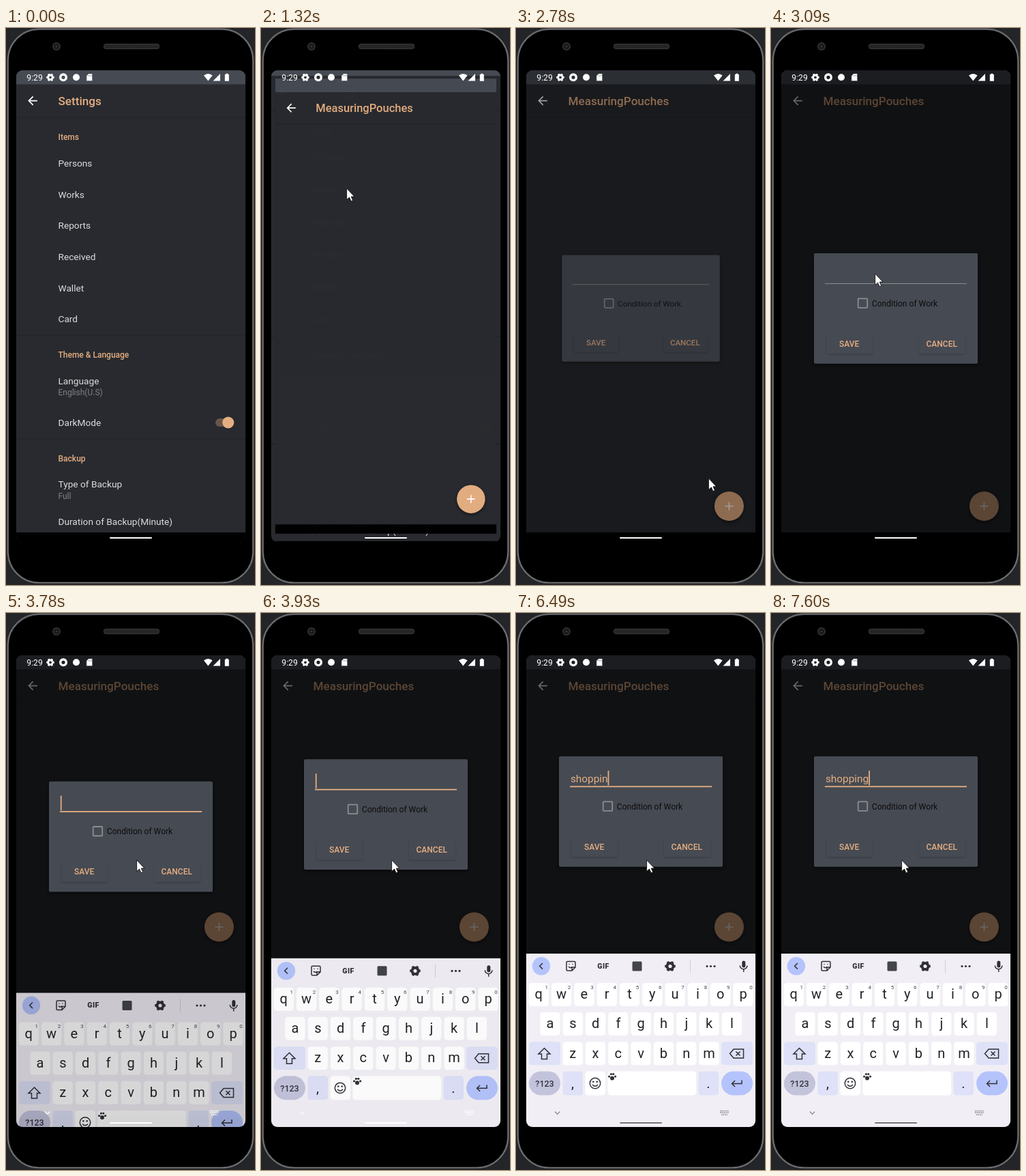
These frames come from a looping animation (365x816 px, 8 s). An HTML page:

```html
<!DOCTYPE html>
<html lang="en">
<head>
<meta charset="utf-8">
<title>Settings</title>
<style>
html, body { margin: 0; width: 100%; height: 100%; overflow: hidden; background: #000; }
svg { display: block; width: 365px; height: 816px; font-family: Roboto, sans-serif; }
.bar { font-size: 17.1px; font-weight: 500; fill: #e5ae82; }
.head { font-size: 12px; font-weight: 500; fill: #e5ae82; }
.row { font-size: 13.68px; fill: #dcdcde; }
.sub { font-size: 12px; fill: #7f8186; }
.key { font-size: 20px; fill: #222327; text-anchor: middle; }
.hint { font-size: 8px; fill: #44454b; text-anchor: middle; }
.line { fill: none; stroke: #303136; stroke-width: 1.5; }
.shade { filter: drop-shadow(0 2px 2px #0008); }
.soft { filter: drop-shadow(0 1px 1px #0003); }
</style>
</head>
<body>
<svg id="stage" viewBox="0 0 365 816"></svg>
<script>
const orange = '#e5ae82', panel = '#464a52', ink = '#303136';
const rect = (x, y, w, h, fill, r = 0, more = '') =>
  `<rect x="${x}" y="${y}" width="${w}" height="${h}" rx="${r}" fill="${fill}" ${more}/>`;
const circle = (x, y, r, fill, more = '') => `<circle cx="${x}" cy="${y}" r="${r}" fill="${fill}" ${more}/>`;
const text = (x, y, s, cls, more = '') => `<text x="${x}" y="${y}" class="${cls}" ${more}>${s}</text>`;
const path = (d, more = 'class="line"') => `<path d="${d}" ${more}/>`;
const group = (id, body, more = '') => `<g id="${id}" ${more}>${body}</g>`;

const gear = (x, y, r, color) =>
  circle(x, y, r * .58, 'none', `stroke="${color}" stroke-width="${r * .5}"`) +
  circle(x, y, r * .86, 'none', `stroke="${color}" stroke-width="${r * .28}" pathLength="12" stroke-dasharray="1" stroke-dashoffset=".5"`);

const phone =
  rect(0, 0, 365, 816, '#242528') +
  rect(.5, -.5, 364, 815.5, '#0c0c0d', 48) +
  rect(2.5, 1.5, 360, 811.5, '#000', 46, 'stroke="#4a4b4e" stroke-width="3"') +
  rect(3, 2, 359, 810.5, 'none', 45, 'stroke="#77787b" stroke-width="1.2"') +
  circle(74, 27, 6, '#303032') + circle(74, 27, 4, '#17181a') + circle(74, 27, 1.6, '#34353a') +
  rect(143, 23, 82, 8, '#39393a', 4) + rect(144, 24, 80, 6, 'url(#mesh)', 3);

const windowBase = title =>
  rect(15, 62, 336, 691, '#282a2f') + rect(15, 62, 336, 20.5, panel) +
  rect(15, 130.5, 336, 1.2, '#222428') +
  path('M20 11H7.83l5.59-5.59L12 4l-8 8 8 8 1.41-1.41L7.83 13H20z', 'fill="#fff" transform="translate(28.8 96.3) scale(.855)"') +
  text(76.5, 113, title, 'bar');
const navBar = rect(15, 739, 336, 14, '#000');

const settings = windowBase('Settings') +
  text(76.5, 164, 'Items', 'head') +
  ['Persons', 'Works', 'Reports', 'Received', 'Wallet', 'Card']
    .map((s, i) => text(76.5, 202.8 + i * 45.7, s, 'row')).join('') +
  [449.5, 601.5].map(y => rect(15, y, 336, 1, '#202226')).join('') +
  text(76.5, 482.5, 'Theme &amp; Language', 'head') +
  text(76.5, 521.5, 'Language', 'row') + text(76.5, 538, 'English(U.S)', 'sub') +
  text(76.5, 583.3, 'DarkMode', 'row') +
  rect(307, 572, 26, 12, '#69564a', 6) + circle(325.7, 578, 8.6, orange, 'class="soft"') +
  text(76.5, 634.5, 'Backup', 'head') +
  text(76.5, 673, 'Type of Backup', 'row') + text(76.5, 690, 'Full', 'sub') +
  text(76.5, 728.3, 'Duration of Backup(Minute)', 'row') + navBar;

const account = windowBase('MeasuringPouches') + navBar +
  group('fab', circle(312.4, 0, 21.5, orange, 'class="shade"') +
    path('M306.400 0h12M312.400 -6v12', 'stroke="#fff" stroke-width="1.6"'));

// Drawn with the top edge at y = 0.
const button = (x, label, tx) =>
  rect(x, 118, 68, 29.5, panel, 2, 'class="soft"') + text(tx, 136.8, label, 'head');
const dialog = rect(63, 0, 240, 161.7, panel, 2, 'class="shade"') +
  rect(79, 44, 208, 1, '#8b8c8e', 0, 'id="underline"') +
  text(79.9, 37.8, '', '', `id="typed" font-size="15.4" fill="${orange}"`) +
  rect(79.9, 21, 1.8, 21.5, orange, 0, 'id="caret"') +
  rect(127.7, 66.3, 13.5, 13.5, 'none', 1, 'stroke="#8b8d90" stroke-width="1.8"') +
  text(147.8, 77.8, 'Condition of Work', '', 'font-size="12.1" fill="#0c0c0e"') +
  button(81, 'SAVE', 100) + button(217, 'CANCEL', 227.5);

const key = (cx, y, c) => rect(cx - 14.6, y, 29.2, 34, '#fff', 4.5) + text(cx, y + 23.3, c, 'key');
const keyRow = (letters, x, y) => [...letters].map((c, i) => key(x + i * 33.3, y, c)).join('');
const tint = '#dee1f7', accent = '#b4c3fb';
const keyboard = rect(15, 499, 336, 320, '#f1eff5') +
  circle(37, 517.3, 13.2, accent) + path('M39 513l-4.3 4.3 4.3 4.3') +
  path('M74 512q0-1.500 1.500-1.500h10q1.500 0 1.500 1.500v7l-5 5h-6.500q-1.500 0-1.500-1.500zM87 519h-5v5M77 518q3 3.500 5 0M78 514v1M83 514v1') +
  text(128, 521, 'GIF', '', `font-size="10.5" font-weight="900" text-anchor="middle" letter-spacing=".4" fill="${ink}"`) +
  rect(170.5, 510.5, 14, 14, '#44454a', 1.5) + gear(226, 517.5, 7.8, ink) +
  rect(255, 508, 1, 19, '#cfced5') +
  [280, 285.5, 291].map(x => circle(x, 517.5, 1.6, ink)).join('') +
  rect(331.3, 509.5, 5, 10, ink, 2.5) + path('M328.300 516.500a5.300 5.300 0 0 0 10.600 0M333.700 522v4') +
  keyRow('qwertyuiop', 33.3, 542) +
  [...'1234567890'].map((c, i) => text(44.8 + i * 33.3, 551, c, 'hint')).join('') +
  keyRow('asdfghjkl', 50, 585) + keyRow('zxcvbnm', 83.2, 628.3) +
  rect(19, 628.3, 46, 34, tint, 4.5) + path('M41.500 637.500l8.500 8.500h-4.500v7.500h-8v-7.500h-4.500z') +
  rect(301, 628.3, 46, 34, tint, 4.5) + path('M319 639h14.500v13H319l-5.500-6.500zM322.500 642.500l6 6M328.500 642.500l-6 6') +
  rect(19, 671.5, 46, 35, '#c3c3dc', 17.5) +
  text(42, 693.8, '?123', '', 'font-size="12.500" font-weight="500" text-anchor="middle" fill="#33343c"') +
  rect(68.5, 671.5, 29.5, 35, tint, 4.5) + text(83, 696, ',', 'key') +
  rect(101.5, 671.5, 29.5, 35, '#fff', 4.5) + circle(116, 689, 7.7, 'none', 'class="line"') +
  circle(113.3, 686.7, 1.3, ink) + circle(118.7, 686.7, 1.3, ink) + path('M112 691q4 4.500 8 0') +
  rect(134.5, 671.5, 129.5, 35, '#fff', 4.5) +
  circle(141, 681.5, 3, ink) + [[136.6, 679], [139.4, 675.5], [142.8, 675.5], [145.6, 679]].map(p => circle(...p, 1.6, ink)).join('') +
  rect(267.5, 671.5, 29.5, 35, tint, 4.5) + text(282, 696, '.', 'key') +
  rect(301, 671.5, 46, 35, accent, 17.5) + path('M331 684.500v5h-14M321 685l-4.500 4.500 4.500 4.500');

const statusIcons = text(30.3, 77, '9:29', '', 'font-size="12.2" fill="#fff"') +
  gear(65, 72.3, 5.8, '#fff') + circle(84, 72.3, 4.3, 'none', 'stroke="#fff" stroke-width="3.4"') +
  circle(103, 72.3, 5, '#fff') +
  path('M121 67h5.500v10.500h-8.500v-7.500zM121 69v2M123 69v2M125 69v2', 'fill="#fff" stroke="#5a5d64" stroke-width=".6"') +
  path('M290 69.500q6.300-5 12.600 0L296.300 77.500zM314 67v10.500h-10.500zM320.800 68h1.500v-1.200h3v1.200h1.500v9.700h-6z', 'fill="#fff"');

const navIcons = path('M57 730.500l3.600 3.600 3.600-3.600', 'fill="none" stroke="currentColor" stroke-width="1.3"') +
  path('M299 729.500h13M299 732h13M301 735h9', 'stroke="currentColor" stroke-width="1.5" stroke-dasharray="1.7 1"');

stage.innerHTML = `<defs>
  <clipPath id="screen">${rect(15, 62, 336, 691, '#000', 9)}</clipPath>
  <pattern id="mesh" width="3" height="3" patternUnits="userSpaceOnUse">${circle(.8, .8, .9, '#111')}${circle(2.3, 2.3, .9, '#111')}</pattern>
  </defs>` + phone +
  `<g clip-path="url(#screen)">` +
  group('oldWin', settings) + group('newWin', account) +
  rect(15, 62, 336, 691, '#000', 0, 'id="dim"') +
  group('box', dialog) + group('keys', keyboard) + group('nav', navIcons) + statusIcons +
  rect(152, 746, 62, 2, '#fff', 1, 'id="handle"') + '</g>' +
  group('mouse', path('M.6 .9V17.600L4.500 14 7 19.700 9.700 18.600 7.200 13H12Z', 'fill="#fff" stroke="#111" stroke-width=".9"'));

// time, x, y
const route = [[290, 332, 795], [460, 195, 392], [550, 195, 392], [840, 125, 234], [1600, 125, 234],
  [2020, 264, 595], [2060, 264, 595], [2400, 300, 701], [2760, 300, 701], [3090, 152, 359],
  [3150, 152, 359], [3400, 189, 359], [3470, 191, 361]];
const typing = [[4860, 's'], [5090, 'sh'], [5330, 'sho'], [5790, 'shop'], [5940, 'shopp'], [6100, 'shoppi'],
  [6490, 'shoppin'], [6570, 'shoppinf'], [7120, 'shoppin'], [7600, 'shopping']];

const $ = id => document.getElementById(id);
const set = (id, attrs) => { for (const k in attrs) $(id).setAttribute(k, attrs[k]); };
const ramp = (t, a, b) => Math.min(1, Math.max(0, (t - a) / (b - a)));
const mix = (a, b, p) => a + (b - a) * p;
const zoom = s => `translate(183 407.500) scale(${s}) translate(-183 -407.500)`;
const gray = v => `rgb(${v},${v},${v})`;

function mouseAt(t) {
  const i = route.findIndex(p => p[0] > t);
  if (i < 0) return route.at(-1).slice(1);
  const a = route[Math.max(0, i - 1)], b = route[i], u = ramp(t, a[0], b[0]), p = u * (2 - u);
  return [mix(a[1], b[1], p), mix(a[2], b[2], p)];
}

function draw(t) {
  const open = 1 - (1 - ramp(t, 1230, 1630)) ** 5.6;
  set('oldWin', { transform: zoom(1 + .05 * open), visibility: t < 1630 ? 'visible' : 'hidden' });
  set('newWin', { transform: zoom(.85 + .15 * open), opacity: ramp(t, 1230, 1322) });

  const typingOn = t >= 3780, rise = (1 - ramp(t, 3780, 4010)) ** 2;
  set('fab', { transform: `translate(0 ${typingOn ? 460 : 700.5})` });

  const show = ramp(t, 2640, 2860), top = typingOn ? 210 + 37 * rise : 330;
  set('dim', { opacity: .6 * show });
  set('box', { opacity: show, transform: `translate(0 ${top}) translate(183 80) scale(${.9 + .1 * show}) translate(-183 -80)` });

  const focused = t >= 3500;
  const typed = typing.findLast(p => p[0] <= t)?.[1] ?? '';
  $('typed').textContent = typed;
  const blink = t >= 4160 && t < 4560;
  set('underline', { fill: focused ? orange : '#8b8c8e', height: focused ? 1.8 : 1, y: focused ? 43.4 : 44 });
  set('caret', {
    x: 79.8 + (typed ? $('typed').getComputedTextLength() : 0),
    visibility: focused && !blink ? 'visible' : 'hidden'
  });

  const shown = typingOn ? 'visible' : 'hidden';
  set('keys', { visibility: shown, opacity: 1 - .17 * rise, transform: `translate(0 ${58 * rise})` });
  set('nav', { visibility: shown, color: gray(mix(255, 135, ramp(t, 4100, 5090))) });
  set('handle', { fill: gray(mix(255, 118, ramp(t, 4100, 5090))) });

  set('mouse', { transform: `translate(${mouseAt(t)})`, visibility: t < 300 ? 'hidden' : 'visible' });
}

const start = performance.now();
function tick() {
  draw((performance.now() - start) % 8000);
  requestAnimationFrame(tick);
}
tick();
</script>
</body>
</html>
```
